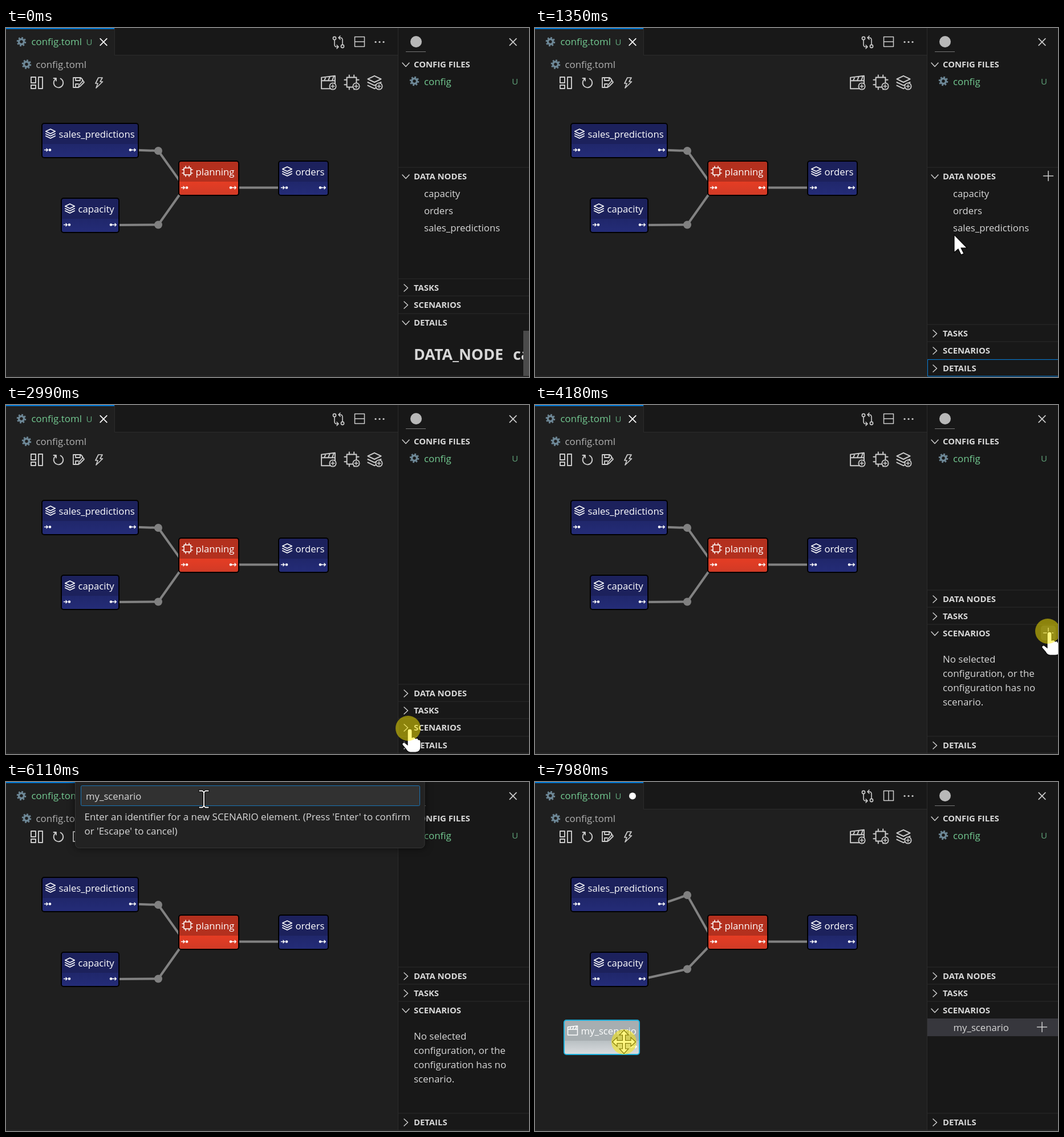
An HTML page that plays this animation: 917 px wide and 611 px high, repeating every 8000 ms.

```html
<!DOCTYPE html>
<html lang="en">
<head>
<meta charset="utf-8">
<title>Configuration editor</title>
<style>
  html, body { margin: 0; width: 100%; height: 100%; overflow: hidden; background: #1f1f1f; }
  svg { display: block; width: 917px; height: 611px; }
  text { font-family: "Open Sans", "Noto Sans", sans-serif; white-space: pre; }
  .line { fill: none; stroke-linejoin: round; stroke-linecap: round; }
</style>
</head>
<body>
<svg id="stage" viewBox="0 0 917 611">
  <g id="base"></g>
  <g id="live"></g>
</svg>
<script>
const LOOP = 8000, STEP = 90;
const GREEN = '#73c991', GREY = '#cccccc', INK = '#d8d8d8', EDGE = '#2b2b2b', BLUE = '#0078d4';
const BODY = 16.9, ITEM = 16.7;

// ---- drawing helpers ----
const rect = (x, y, w, h, fill, more = '') =>
  `<rect x="${x}" y="${y}" width="${w}" height="${h}" fill="${fill}" ${more}/>`;
const dot = (x, y, r, fill, more = '') =>
  `<circle cx="${x}" cy="${y}" r="${r}" fill="${fill}" ${more}/>`;
const line = (d, color = GREY, w = 1.6, more = '') =>
  `<path class="line" d="${d}" stroke="${color}" stroke-width="${w}" ${more}/>`;
const at = (x, y, body, k = 1) => `<g transform="translate(${x} ${y}) scale(${k})">${body}</g>`;
// y is the middle of the letters
const text = (x, y, s, fill = INK, size = BODY, more = '') =>
  `<text x="${x}" y="${y + size * .36}" fill="${fill}" style="font-size:${size}px" ${more}>${s}</text>`;
const item = (x, y, s, fill = INK) => text(x, y, s, fill, ITEM);
const bold = (x, y, s, size = 14.85) => text(x, y, s, INK, size, 'font-weight="700"');

const cross = (x, y, r, c) => at(x, y, line(`M${-r} ${-r}L${r} ${r}M${-r} ${r}L${r} ${-r}`, c, 1.7));
const plus = (x, y) => at(x, y, line('M-8.5 0H8.5M0-8.5V8.5', GREY, 1.5));
const gear = (x, y) => at(x, y,
  dot(0, 0, 4.5, 'none', 'stroke="#6d8796" stroke-width="3.4"') +
  dot(0, 0, 7, 'none', 'stroke="#6d8796" stroke-width="2.6" stroke-dasharray="2.75"'));
const chevron = (y, open) => at(701, y, line(open ? 'M-6-3L0 3.5L6-3' : 'M-3-6L3.5 0L-3 6', GREY, 1.5));

// ---- node glyphs ----
const glyphs = {
  layers: 'M0-8L8.3-4L0 0L-8.3-4ZM-8.3 0L0 4L8.3 0M-8.3 4L0 8L8.3 4',
  chip: 'M-6-6H6V6H-6ZM-3-6V-9M3-6V-9M-3 6V9M3 6V9M-6-3H-9M-6 3H-9M6-3H9M6 3H9',
  clap: 'M-8.5-2H8.5V8H-8.5ZM-8.5-2V-6L8.5-8V-2M-5-2L-3-6.5M0-2L2-7M5-2L7-7.5'
};
const glyph = (x, y, name, k = 1) => at(x, y, line(glyphs[name], '#fff', 1.5), k);
const addTool = (x, name) => at(x, 95,
  at(0, 0, line(glyphs[name], GREY, 1.4), 1.4) +
  dot(8, 7, 5.7, '#1f1f1f', `stroke="${GREY}" stroke-width="1.7"`) +
  line('M5 7H11M8 4V10', GREY, 1.5));

const skins = {
  data: ['#1c215c', '#20276b', '#242c78'],
  task: ['#b3301e', '#e53d24', '#d03a26'],
  scenario: ['#a7aeb1', '#b9c0c3', '#dadde0']
};
const icons = { data: 'layers', task: 'chip', scenario: 'clap' };

function node(x, y, w, kind, label, ports, border = '#000') {
  const [top] = skins[kind], out = w - 14;
  const head = x => `M${x - 2.3} 44.2L${x} 46.5L${x - 2.3} 48.8`;
  return at(x, y,
    rect(0, 0, w, 60, `url(#${kind})`, 'rx="4"') +
    `<path d="M0 36V4Q0 0 4 0H${w - 4}Q${w} 0 ${w} 4V36Z" fill="${top}"/>` +
    rect(0, 0, w, 60, 'none', `rx="4" stroke="${border}" stroke-width="2"`) +
    glyph(15, 18, icons[kind]) + item(29.5, 18.5, label, '#fff') +
    (ports > 1 ? line('M4.5 46.5H10' + head(10.3), '#fff', 1.4) + dot(14, 46.5, 2.3, '#fff') : '') +
    line(`M${out} 46.5h9` + head(out + 9.3), '#fff', 1.4) + dot(out, 46.5, 2.3, '#fff'));
}

const fades = Object.entries(skins).map(([id, [, a, b]]) =>
  `<linearGradient id="${id}" x1="0" y1=".6" x2="0" y2="1">
    <stop offset="0" stop-color="${a}"/><stop offset="1" stop-color="${b}"/></linearGradient>`).join('');

// ---- parts that never change ----
document.getElementById('base').innerHTML = `<defs>${fades}</defs>` +
  rect(0, 0, 917, 611, '#1f1f1f') + rect(190, 0, 497, 47, '#181818') + rect(687, 0, 230, 611, '#181818') +
  rect(190, 47, 497, 1, EDGE) + rect(190, 0, 1, 48, EDGE) + rect(687, 0, 1, 611, EDGE) +
  rect(0, 609, 917, 1.5, EDGE) + rect(0, 0, 190, 2, BLUE) +
  gear(27, 24) + text(44.5, 24, 'config.toml', GREEN) + text(140.5, 24.5, 'U', '#60a47a', 15) +
  gear(36, 63.5) + text(52.5, 64, 'config.toml', '#b0b0b0') +
  // editor tools
  at(54, 96, line('M-10-10H-2V0H-10ZM-10 4H-2V10H-10ZM3-10H10V10H3Z', GREY, 1.9)) +
  at(92, 96, line('M-4.5-7A8.3 8.3 0 1 0 3.5-7.5M-8.5-8H-4V-3.5', GREY, 1.8)) +
  at(127, 96, line('M-1 8H-9V-9H4L7-6V-3M-5-9V-4H3V-9M-5 8V2H0M0 8L1 4L8-4L10-1L3 6Z', GREY, 1.8)) +
  at(163, 96, line('M-1-9H6L2-2H6.5L-5 9L-2 1H-6Z', GREY, 1.7)) +
  addTool(565, 'clap') + addTool(606, 'chip') + addTool(646, 'layers') +
  at(583, 25, line('M-7-5V4Q-7 8-3 8H0M-3 5L0 8L-3 11M7 4V-4Q7-8 3-8H0M3-11L0-8L3-5', GREY, 1.6) +
    dot(-7, -7, 2.6, '#181818', `stroke="${GREY}" stroke-width="1.6"`) +
    dot(7, 7, 2.6, '#181818', `stroke="${GREY}" stroke-width="1.6"`)) +
  [648, 655, 662].map(x => dot(x, 24.5, 1.6, GREY)).join('') +
  // side panel top
  dot(719, 24, 10, '#b8b8b8') + rect(701, 41, 35, 1, '#777') + cross(889, 24.5, 5.8, GREY) +
  chevron(64, true) + bold(715, 64, 'CONFIG FILES') +
  gear(716, 93) + text(733, 93.5, 'config', GREEN) + text(887, 93.5, 'U', '#60a47a', 15);

// ---- timeline ----
const easeOut = p => 1 - (1 - p) ** 2;
const linear = p => p;
// start, steps, x, y, easing
const moves = [
  [500, 1, 714, 532, linear],
  [700, 3, 701, 516, linear],
  [1080, 4, 735, 362, linear],
  [1440, 8, 699, 259, easeOut],
  [2270, 9, 705, 566, easeOut],
  [3190, 12, 899, 396, easeOut],
  [4580, 9, 347, 30, easeOut],
  [6610, 8, 144, 133, easeOut],
  [7330, 3, 134, 171, linear],
  [7710, 4, 156, 455, linear]
];
const clicks = [[880, 1080], [2070, 2270], [2990, 3190], [4180, 4580], [7510, LOOP]];
const within = (t, a, b) => t >= a && t < b;

function pointer(t) {
  let x = 714, y = 532;
  for (const [start, n, tx, ty, ease] of moves) {
    if (t < start) break;
    const p = ease(Math.min(1, (Math.floor((t - start) / STEP) + 1) / n));
    x += (tx - x) * p;
    y += (ty - y) * p;
  }
  return { x, y };
}

function panes(t) {
  const tops = t < 1080 ? [244, 439, 469, 500] : t < 2270 ? [244, 519, 549, 580]
    : t < 3190 ? [489, 519, 549, 580] : [324, 354, 384, 580];
  const open = [t < 2270, false, t >= 3190, t < 1080];
  const focus = within(t, 1080, 2070) ? 3 : within(t, 2270, 2990) ? 0
    : within(t, 3190, 4180) || within(t, 6610, 7510) ? 2 : -1;
  return { tops, open, focus };
}

const titles = ['DATA NODES', 'TASKS', 'SCENARIOS', 'DETAILS'];

function sidebar(t, { tops, open, focus }, cur) {
  let s = '';
  titles.forEach((name, i) => {
    const y = tops[i];
    s += rect(688, y - .5, 229, 1, EDGE) + chevron(y + 16, open[i]) + bold(715, y + 16, name);
    if (i === focus) s += rect(688.5, y + .5, 230, 29, 'none', `stroke="${BLUE}"`);
  });
  if (open[0]) {
    ['capacity', 'orders', 'sales_predictions'].forEach((n, i) => s += item(733, 289.5 + i * 30.2, n));
    if (t >= 1080) s += plus(900, 259);
  }
  if (open[2]) {
    if (t < 4580 && cur.x > 885) s += rect(887, 386, 26, 26, '#2f3031', 'rx="5"');
    if (t < 4580 || focus === 2) s += plus(900, 399);
    if (t < 6610) {
      ['No selected', 'configuration, or the', 'configuration has no', 'scenario.']
        .forEach((n, i) => s += text(715, 445 + i * 25, n));
    } else {
      if (t >= 7510) s += rect(688, 414, 229, 31, '#37373d') + plus(889, 429);
      s += item(733.5, 430, 'my_scenario');
    }
  }
  if (open[3]) s += bold(715, 571, 'DATA_NODE', 26.8) + bold(889, 571, 'ca', 26.8) +
    rect(907, 530, 10, 79, '#4b4b4b');
  return s;
}

function graph(t, cur) {
  const shift = t >= 6610 ? -17 : 0;
  const wire = d => line(d, '#828282', 4);
  let s = wire(`M222 213.5L267 ${215 + shift}L313 279.5`) + wire(`M188 345L267 ${344.5 + shift}L313 279.5`) +
    wire('M398 279.5H488') + dot(267, 215 + shift, 7, '#808080') + dot(267, 344.5 + shift, 7, '#808080') +
    node(63, 167, 169, 'data', 'sales_predictions', 2) + node(97, 298, 101, 'data', 'capacity', 2) +
    node(303, 233, 105, 'task', 'planning', 2) + node(478, 233, 87, 'data', 'orders', 2);
  if (t >= 6610) {
    const held = t >= 7510;
    s += node(held ? cur.x - 105 : 29, held ? cur.y - 38 : 133, 132, 'scenario', 'my_scenario', 1,
      held ? '#1cb0dc' : '#000');
  }
  return s;
}

function tabState(t) {
  const dirty = t >= 6610;
  return (dirty ? dot(171, 24.5, 6, '#fff') : cross(171, 24.5, 5.8, '#fff')) +
    at(620, 24, line('M-8.5-8.5H8.5V8.5H-8.5Z' + (dirty ? 'M0-8.5V8.5' : 'M-8.5 0H8.5'), GREY, 1.5));
}

function dialog(t) {
  if (!within(t, 4580, 6610)) return '';
  const typed = Math.max(0, Math.floor((t - 5210) / STEP) + 1);
  return rect(121.5, -10, 612.5, 125.5, '#222', 'rx="7" stroke="#353535" style="filter:drop-shadow(0 0 7px #0009)"') +
    rect(131.5, 6.5, 594, 35, '#313131', 'rx="2" stroke="#1a75b5"') +
    item(140, 25, 'my_scenario'.slice(0, typed)) +
    text(137.5, 61, "Enter an identifier for a new SCENARIO element. (Press 'Enter' to confirm") +
    text(137.5, 85.5, "or 'Escape' to cancel)");
}

const cursors = {
  arrow: 'M0 0V31L7 25L12 35L17 33L12 23H22.5Z',
  hand: 'M-1 5Q-1 1 3 1Q7 1 7 5V16Q11 14 13 18Q17 16 18 20Q22 19 22 24V32Q22 42 13 42H4Q-1 42-4 36L-10 29Q-11 24-6 25L-1 29Z',
  beam: 'M-9-16H-2L0-14L2-16H9V-13H3L1.5-11V11L3 13H9V16H2L0 14L-2 16H-9V13H-3L-1.5 11V-11L-3-13H-9Z',
  move: 'M0-20.5L8-12H2.5V-2.5H12V-8L20.5 0L12 8V2.5H2.5V12H8L0 20.5L-8 12H-2.5V2.5H-12V8L-20.5 0L-12-8V-2.5H-2.5V-12H-8Z'
};

function cursorKind(t, { x, y }, { tops, open }) {
  if (within(t, 4580, 6610)) return within(x, 131, 726) && y < 43 ? 'beam' : 'arrow';
  if (t >= 6610) return t >= 7510 || (x < 162 && y >= 132) ? 'move' : 'arrow';
  const onHeader = tops.some(top => within(y, top, top + 30));
  return onHeader || (open[0] && within(y, 275, 361)) ? 'hand' : 'arrow';
}

function pointerArt(t, cur, lay) {
  if (t < 500) return '';
  const art = `<path d="${cursors[cursorKind(t, cur, lay)]}" fill="#fff" stroke="#000" stroke-width="1.1"/>`;
  const lit = clicks.some(([a, b]) => within(t, a, b));
  return at(cur.x, cur.y, art + (lit ? dot(0, 0, 22, '#ffee00', 'fill-opacity=".5"') : ''));
}

const live = document.getElementById('live');
const start = performance.now();
let shown = '';

function draw(t) {
  const cur = pointer(t), lay = panes(t);
  const art = tabState(t) + graph(t, cur) + sidebar(t, lay, cur) + dialog(t) + pointerArt(t, cur, lay);
  if (art !== shown) live.innerHTML = shown = art;
}

function tick() {
  draw((performance.now() - start) % LOOP);
  requestAnimationFrame(tick);
}
tick();
</script>
</body>
</html>
```
